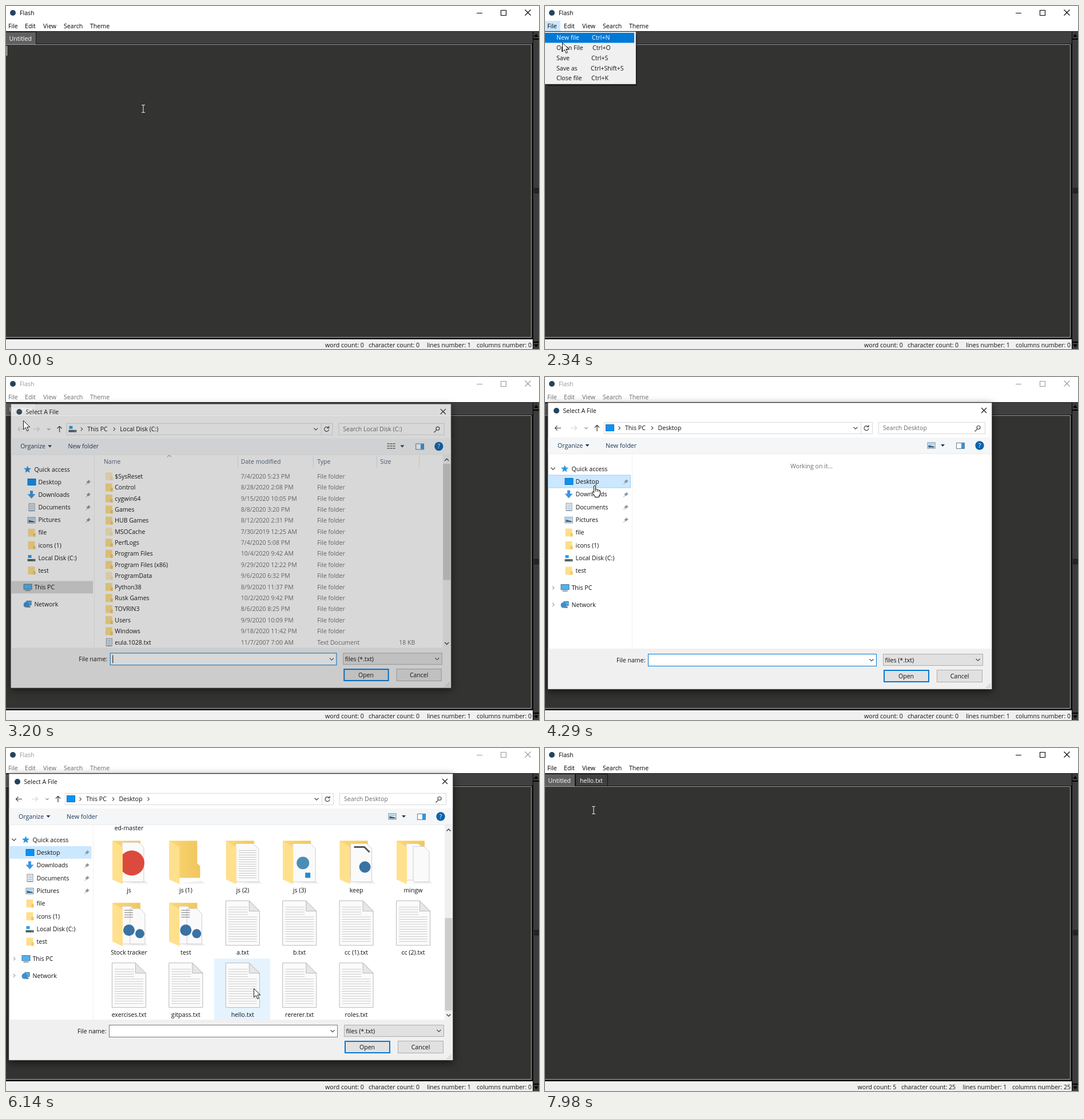
These frames come from a looping animation (932x601 px, 8 s). An HTML page:

```html
<!DOCTYPE html>
<html lang="en">
<head>
<meta charset="utf-8">
<title>Text editor</title>
<style>
html, body { margin: 0; width: 100%; height: 100%; overflow: hidden; background: #333332; }
svg { display: block; }
text { font: 10.6px "Open Sans", "Noto Sans", sans-serif; white-space: pre; }
</style>
</head>
<body>
<svg id="stage" width="932" height="601" viewBox="0 0 932 601"></svg>
<script>
const LOOP = 8000;
const stage = document.getElementById('stage');

// Markup helpers
const text = (x, y, s, fill = '#111', extra = '') =>
  `<text x="${x}" y="${y + 3.8}" fill="${fill}" ${extra}>${s}</text>`;
const rect = (x, y, w, h, fill, extra = '') =>
  `<rect x="${x}" y="${y}" width="${w}" height="${h}" fill="${fill}" ${extra}/>`;
const box = (x, y, w, h, fill, line, id = '') =>
  rect(x + .5, y + .5, w - 1, h - 1, fill, `stroke="${line}" ${id && `id="${id}"`}`);
const line = (d, color, w = 1, extra = '') =>
  `<path d="${d}" fill="none" stroke="${color}" stroke-width="${w}" ${extra}/>`;
const shape = (d, fill, extra = '') => `<path d="${d}" fill="${fill}" ${extra}/>`;
const dot = (x, y, r, fill) => `<circle cx="${x}" cy="${y}" r="${r}" fill="${fill}"/>`;
const group = (id, body, extra = '') => `<g id="${id}" ${extra}>${body}</g>`;
const down = (x, y, c = '#444', r = 3.5) => line(`M${x - r} ${y - r / 2}l${r} ${r}l${r} ${-r}`, c, 1.1);
const right = (x, y, c = '#555') => line(`M${x - 1.5} ${y - 3}l3 3l-3 3`, c, 1.1);
const caretDown = (x, y, c) => shape(`M${x - 3.5} ${y - 2}h7l-3.5 4z`, c);
const feather = (x, y) => dot(x, y, 5, '#24435c');

// Small icons, centred on x, y
const miniFolder = (x, y, o = 1) =>
  `<g opacity="${o}">${rect(x - 6, y - 7, 12, 14, '#ffdf8a')}${rect(x + 3, y + 1, 4, 6, '#f3c85c')}</g>`;
const miniDoc = (x, y) => box(x - 5, y - 7, 11, 14, '#fff', '#7a8a96') +
  line(`M${x - 3} ${y - 3.5}h7m-7 3h7m-7 3h7m-7 3h7`, '#6c8fae');
const icons = {
  star: (x, y) => shape(`M${x} ${y - 6.5}l1.8 4.4l4.7 .3l-3.6 3l1.2 4.7l-4.1-2.6l-4.1 2.6l1.2-4.7l-3.6-3l4.7-.3z`, '#2f96e0'),
  desk: (x, y) => box(x - 7, y - 6, 15, 12, '#0a93f5', '#0a6cbd'),
  down: (x, y) => shape(`M${x - 2.5} ${y - 7}h5v6h4.5l-7 8l-7-8h4.5z`, '#3b96e3'),
  doc: miniDoc,
  pic: (x, y) => box(x - 7, y - 5, 14, 11, '#f4f8fa', '#75828c') + rect(x - 5, y - 3, 10, 3, '#9fd0f0') +
    shape(`M${x - 5} ${y + 4}v-4l4 1l6 1v2z`, '#2d5a80'),
  folder: miniFolder,
  drive: (x, y) => rect(x - 7, y + 2, 14, 4, '#555c63') + rect(x + 3, y + 3.5, 2, 1, '#5cf07a') +
    rect(x - 6, y - 5, 6, 5, '#20a0ec'),
  pc: (x, y) => box(x - 7, y - 6, 15, 10, '#4fb3f3', '#4d6f8a') + rect(x - 4, y + 5, 9, 1.5, '#6d7e8b'),
  net: (x, y) => box(x - 2, y - 6, 9, 8, '#4fb3f3', '#3d6c92') + dot(x - 2, y + 1, 5, '#3d8fd0') + rect(x, y + 3, 5, 3, '#6d7e8b')
};
const pin = (x, y) => shape(`M${x} ${y - 4}l4 4l-2 .5l-2 2.5l-1.5-1l-3 3l-.5-.5l3-3l-1.5-2l3-1.5z`, '#8b959c');

// Large icons; x is the tile centre, y the middle of its label
const paper = (x, y) => {
  let rows = '';
  for (let i = 0; i < 15; i++) rows += `M${x - 25} ${y - 79.5 + i * 4.3}h${i < 4 ? 34 : 50}`;
  return shape(`M${x - 29.5} ${y - 90.5}h41l18 18v60h-59z`, '#fbfbfb', 'stroke="#b9b9b9"') +
    line(rows, '#c9c9c9') + shape(`M${x + 11.5} ${y - 90.5}v18h18z`, '#e6e6e6', 'stroke="#b9b9b9"');
};
const sheet = (x, y, w, h) => shape(`M${x} ${y}h${w - 9}l9 9v${h - 9}h${-w}z`, '#fafafa', 'stroke="#cfcfcf"');
const lines = (x, y, w, n, c) => {
  let d = '';
  for (let i = 0; i < n; i++) d += `M${x} ${y + i * 4}h${w}`;
  return line(d, c);
};
const fills = {
  disc: (x, y) => sheet(x - 12, y - 84, 38, 69) + dot(x + 5, y - 48, 22, '#dc4a3d'),
  text: (x, y) => sheet(x - 12, y - 82, 40, 67) + lines(x - 7, y - 70, 31, 13, '#c6c6c6'),
  code: (x, y) => sheet(x - 12, y - 82, 40, 67) + dot(x + 6, y - 48, 11, '#4b8db5') + rect(x + 10, y - 31, 9, 9, '#2489ca'),
  snake: (x, y) => sheet(x - 10, y - 82, 37, 67) + line(`M${x - 4} ${y - 76}h18l9 9`, '#555', 3) +
    dot(x + 15, y - 41, 10, '#3972a3'),
  pages: (x, y) => sheet(x - 12, y - 82, 30, 64) + sheet(x, y - 77, 28, 62),
  snakes: (x, y) => sheet(x - 12, y - 81, 24, 66) + sheet(x + 2, y - 77, 26, 62) +
    lines(x - 8, y - 74, 15, 4, '#777') + dot(x, y - 39, 10, '#3972a3') + dot(x + 19, y - 33, 8, '#3972a3')
};
const folder = (x, y, kind) => {
  const back = shape(`M${x - 29} ${y - 87}h49v40l5 4v21h-54z`, 'url(#fold)');
  const flap = shape(`M${x - 29} ${y - 87}l18 11v65l-18-8z`, '#ffe08d');
  return shape(`M${x - 10} ${y - 12}l38-5l6 5z`, '#eee') + back + (kind ? fills[kind](x, y) : '') + flap;
};
const tileX = c => 215 + c * 99.4;
const tile = (c, y, name, icon) => icon + text(tileX(c), y, name, '#111', 'text-anchor="middle"');

// Editor window
const menus = [[4, 'File'], [33, 'Edit'], [65, 'View'], [101, 'Search'], [147, 'Theme']];
const editor = rect(0, 0, 932, 45, '#fff') + feather(12, 12) +
  rect(0, 26, 27, 18, '#cce8ff', 'id="menuHot"') +
  group('title', text(24, 12, 'Flash', 'currentColor')) +
  group('menuBar', menus.map(m => text(m[0], 35, m[1], 'currentColor')).join('')) +
  group('winBtns', line('M823 12.5h10M865.5 7.5h9v9h-9zM907.5 6.5l10 10m0-10l-10 10', 'currentColor', 1.1)) +
  rect(0, 44, 932, 1, '#222') + rect(0, 45, 921, 22, '#404040') + rect(0, 66, 921, 2, '#111') +
  rect(0, 68, 921, 514, '#333332') + line('M0 67.5H918.5V580.5H0', '#a0a0a0') +
  rect(0, 582, 921, 2, '#0c0c0c') + rect(919, 67, 2, 517, '#1b1b1b') +
  rect(0, 46, 52, 21, '#606060') + line('M0 45.5H52.5V67', '#161616') + text(5.5, 57, 'Untitled', '#fff') +
  group('newTab', rect(54, 46, 55, 20, '#404040') + line('M53.5 67V45.5H109.5V67', '#111') + text(61, 57, 'hello.txt', '#fff')) +
  rect(0, 584, 921, 17, '#f0f0f0') + group('status', [0, 1, 2, 3].map(() => text(0, 594, '')).join('')) +
  rect(921, 45, 11, 556, '#3c3c3c') + rect(921, 45, 1, 556, '#000') +
  rect(922, 57, 10, 2, '#000') + rect(922, 588, 10, 2, '#000') +
  shape('M923 54h8l-4-5zM923 593h8l-4 5z', '#000') +
  line('M923 319.5h9m-9 2h9m-9 2h9m-9 2h9m-9 2h9', '#0a0a0a') +
  rect(1, 70, 1, 17, '#fff', 'id="caret"');

// File menu
const fileItems = [['New file', 82, 'Ctrl+N'], ['Open File', 83, 'Ctrl+O'], ['Save', 81, 'Ctrl+S'],
  ['Save as', 80, 'Ctrl+Shift+S'], ['Close file', 81, 'Ctrl+K']];
const itemY = i => 55.5 + i * 17.75;
const menuRow = (m, i) => group('item' + i, text(20, itemY(i), m[0], 'currentColor') + text(m[1], itemY(i), m[2], 'currentColor'));
const fileMenu = group('fileMenu', rect(3, 49, 158, 91, '#000', 'opacity=".35"') + box(-1, 45, 160, 92, '#f0f0f0', '#cfcfcf') +
  rect(0, 47, 156, 17.5, '#0078d7', 'id="itemHot"') + fileItems.map(menuRow).join('')) +
  group('itemFade', rect(0, 64.5, 156, 17.5, '#0078d7') + text(20, 73, 'Open File', '#fff') + text(83, 73, 'Ctrl+O', '#fff'));

// Dialog
const nav = [['star', 'Quick access'], ['desk', 'Desktop'], ['down', 'Downloads'], ['doc', 'Documents'], ['pic', 'Pictures'],
  ['folder', 'file'], ['folder', 'icons (1)'], ['drive', 'Local Disk (C:)'], ['folder', 'test'], ['pc', 'This PC'], ['net', 'Network']];
const navY = i => 160.7 + i * 22.35 + (i > 8 ? 7.3 * (i - 8) : 0);
const navRow = ([icon, name], i) => {
  const dx = i === 0 || i > 8 ? 0 : 7;
  return icons[icon](34.5 + dx, navY(i)) + text(46.5 + dx, navY(i), name) + (i > 0 && i < 5 ? pin(142, navY(i)) : '');
};

const drive = ['$SysReset|7/4/2020 5:23 PM', 'Control|8/28/2020 2:08 PM', 'cygwin64|9/15/2020 10:05 PM', 'Games|8/8/2020 3:20 PM',
  'HUB Games|8/12/2020 2:31 PM', 'MSOCache|7/30/2019 12:25 AM', 'PerfLogs|7/4/2020 5:08 PM', 'Program Files|10/4/2020 9:42 AM',
  'Program Files (x86)|9/29/2020 12:22 PM', 'ProgramData|9/6/2020 6:32 PM', 'Python38|8/9/2020 11:37 PM',
  'Rusk Games|10/2/2020 9:42 PM', 'TOVRIN3|8/6/2020 8:25 PM', 'Users|9/9/2020 10:09 PM', 'Windows|9/18/2020 11:42 PM',
  'eula.1028.txt|11/7/2007 7:00 AM'];
const driveRow = (entry, i) => {
  const [name, date] = entry.split('|'), y = 173 + i * 19.55, isText = i === 15;
  const hidden = [0, 5, 9].includes(i);
  return (isText ? miniDoc(178, y) : miniFolder(178, y, hidden ? .5 : 1)) + text(188.5, y, name) +
    text(411, y, date, '#6d6d6d') + text(545.5, y, isText ? 'Text Document' : 'File folder', '#6d6d6d') +
    (isText ? text(718, y, '18 KB', '#6d6d6d', 'text-anchor="end"') : '');
};
const driveView = group('driveView',
  [[169, 'Name'], [411, 'Date modified'], [545.5, 'Type'], [656.5, 'Size']].map(h => text(h[0], 146.5, h[1], '#4c607a')).join('') +
  line('M405.5 136v23m133-23v23m112-23v23m75-23v23', '#e3e3e3') + line('M281 139l3.5-3.5l3.5 3.5', '#777') +
  drive.map(driveRow).join(''));

const early = ['app', 'backup', 'cpp', 'css', 'data', 'demo', 'docs', 'drafts', 'editor', 'forms', 'html', 'images',
  'text-', 'ide', 'java', 'jobs', 'joke', 'jquery'];
const folders = [['js', 'disc'], ['js (1)', ''], ['js (2)', 'text'], ['js (3)', 'code'], ['keep', 'snake'], ['mingw', 'pages'],
  ['Stock tracker', 'snakes'], ['test', 'snakes']];
const files = ['a.txt', 'b.txt', 'cc (1).txt', 'cc (2).txt', 'exercises.txt', 'gitpass.txt', 'hello.txt', 'rererer.txt', 'roles.txt'];
const place = (i, name, make) => {
  const c = i % 6, y = 249.5 + 108.8 * Math.floor(i / 6);
  return tile(c, y, name, make(tileX(c), y));
};
const deskView = group('deskView', group('scroll',
  rect(0, 0, 98, 108, '#e5f3ff', 'id="tileHot"') +
  early.map((n, i) => {
    const c = i % 6, y = -80 + 103 * Math.floor(i / 6);
    return tile(c, y, n, folder(tileX(c), y, i % 3 ? 'text' : ''));
  }).join('') + text(tileX(0), 140.5, 'ed-master', '#111', 'text-anchor="middle"') +
  folders.map((f, i) => place(i, f[0], (x, y) => folder(x, y, f[1]))).join('') +
  files.map((f, i) => place(i + 8, f, paper)).join('')), 'clip-path="url(#view)"');

const dialog = group('dialog',
  rect(5, 45, 776.5, 502, '#fff', 'stroke="#555" stroke-width=".8" style="filter:drop-shadow(0 4px 7px rgba(0,0,0,.6))"') +
  feather(20, 59) + text(31.5, 59, 'Select A File') + line('M763 54l9 9m0-9l-9 9', '#111', 1.1) +
  line('M28 89.5H17.5m4-4l-4 4l4 4', '#444', 1.2, 'id="back"') + line('M45 89.5h10.5m-4-4l4 4l-4 4', '#d4d4d4', 1.2) +
  down(72, 89.5, '#888', 2.5) + line('M91 95V84.5m-4 4l4-4l4 4', '#444', 1.3) +
  box(103, 79, 470, 21, '#fff', '#d9d9d9') + line('M552.5 80v19', '#d9d9d9') + down(543, 89.5) +
  line('M565 87a4 4 0 1 0 1 3M566 84v3.5h-3.5', '#444', 1.2) +
  right(130, 89.5) + text(140, 89.5, 'This PC') + right(187.5, 89.5) +
  group('atDrive', icons.drive(114, 89) + text(197.5, 89.5, 'Local Disk (C:)')) +
  group('atDesk', icons.desk(113, 89) + text(197.5, 89.5, 'Desktop')) + group('crumb', right(249, 89.5)) +
  box(583, 79, 187, 21, '#fff', '#d9d9d9') + text(591, 89.5, '', '#6d6d6d', 'id="search"') +
  line('M755.5 91.5l-4 4M761 88.5a3 3 0 1 1-6 0a3 3 0 1 1 6 0', '#444', 1.2) +
  rect(5.5, 106, 775.5, 28, '#f5f6f7') + rect(5.5, 134, 775.5, 1, '#ebebeb') +
  text(22, 120, 'Organize', '#1e395b') + caretDown(74, 120, '#1e395b') + text(106, 120, 'New folder', '#1e395b') +
  group('listIcon', line('M669 115.5h4m1 0h4m1 0h4m-14 4h4m1 0h4m1 0h4m-14 4h4m1 0h4m1 0h4', '#666', 1.5)) +
  group('picIcon', icons.pic(675.5, 119.5)) + caretDown(695.5, 120, '#1e395b') +
  box(719, 115, 15, 11, '#fff', '#5f7d95') + rect(728, 116, 5, 9, '#2f96e0') +
  dot(760, 120, 7.7, '#0a63b0') + text(760, 120, '?', '#fff', 'text-anchor="middle" font-weight="bold"') +
  rect(152, 135, 1, 341, '#f0f0f0') +
  rect(5.5, 358, 144.5, 22, '#d9d9d9', 'id="pcRow"') +
  rect(5.5, 172, 144, 22, '#cce8ff', 'id="deskRow"') + rect(5.5, 0, 144, 22, '#e5f3ff', 'id="navHot"') +
  group('chevrons', down(14, 160.5, '#333', 3.7) + right(14.5, navY(9), '#999') + right(14.5, navY(10), '#999')) +
  nav.map(navRow).join('') + driveView + deskView + group('working', text(429, 156.5, 'Working on it...', '#6d6d6d')) +
  group('bar', rect(767, 135, 14, 341, '#f0f0f0') + rect(767.5, 151, 13, 205, '#cdcdcd', 'id="thumb"') +
    line('M770.5 145.5l3.5-3.5l3.5 3.5m-7 21', 'none') + line('M770.5 145.5l3.5-3.5l3.5 3.5M770.5 466.5l3.5 3.5l3.5-3.5', '#444', 1.5)) +
  rect(5.5, 476, 775.5, 70.5, '#f0f0f0') + text(175.5, 496, 'File name:', '#111', 'text-anchor="end"') +
  box(180, 485, 400, 22, '#fff', '#0078d7', 'nameBox') + down(571, 496) +
  group('fileName', rect(183, 488, 42, 15, '#0078d7', 'id="nameSel"') + text(183.5, 496, 'hello.txt', 'currentColor')) +
  rect(184.5, 489, 1, 14, '#000', 'id="nameCaret"') +
  box(591, 485, 175, 21, '#e1e1e1', '#adadad') + text(594.5, 496, 'files (*.txt)') + down(757, 495.5) +
  rect(593, 514, 78, 20, '#e1e1e1', 'id="openBtn" stroke="#0078d7" stroke-width="2"') +
  text(631.5, 524, 'Open', '#111', 'text-anchor="middle"') +
  box(685, 513, 80, 22, '#e1e1e1', '#adadad') + text(725, 524, 'Cancel', '#111', 'text-anchor="middle"') +
  [[0, 0], [-3, 0], [-6, 0], [0, -3], [-3, -3], [0, -6]].map(p => rect(777 + p[0], 543 + p[1], 1.6, 1.6, '#b5b5b5')).join(''));

const pointer = group('pointer',
  group('arrow', shape('M.5 .5v15.5l3.7-3.4l2.6 6l2.5-1l-2.6-5.9h5z', '#fff', 'stroke="#000" stroke-width=".9"')) +
  group('hand', shape('M-1.5 1q1.5-2 3 0v6q2-1 3 .6q2-.6 2.7 1q2.3-.5 2.5 1.5v4.4l-2 3.5v2.5h-7.5v-2l-4.7-5.5q-.8-2 1.2-2l1.8 1.7z', '#fff', 'stroke="#000"') +
    line('M1.5 7v4m3-3.4v3.4m2.7-2.4v3', '#000', .8)) +
  group('beam', line('M-3 -6.5h2.3l.7 .7l.7-.7h2.3M0 -6v12M-3 6.5h2.3l.7-.7l.7 .7h2.3', '#e4e4e4', 1.1)));

stage.innerHTML = `<defs><linearGradient id="fold"><stop offset="0" stop-color="#fbd775"/><stop offset="1" stop-color="#f0c55c"/></linearGradient>
  <clipPath id="view"><rect x="153" y="135" width="614" height="341"/></clipPath></defs>` + editor + fileMenu + dialog + pointer;

const el = {};
stage.querySelectorAll('[id]').forEach(n => el[n.id] = n);
const show = (id, on) => el[id].style.display = on ? '' : 'none';
const set = (id, name, v) => el[id].setAttribute(name, v);
const clamp = v => Math.max(0, Math.min(1, v));
const span = (t, a, b) => clamp((t - a) / (b - a));
const ease = p => p * p * (3 - 2 * p);

// Pointer stops: time, x, y
const stops = [[0, 240, 180], [290, 240, 180], [820, 14, 31], [2090, 14, 31], [2340, 30, 64], [2500, 30, 76], [3280, 30, 76],
  [3480, 48, 132], [4240, 87, 190], [4400, 87, 190], [4860, 703, 260], [5400, 703, 260], [6140, 433, 421], [6200, 412, 427],
  [6320, 401, 424], [6500, 401, 424], [7080, 636, 522], [7390, 636, 522], [7970, 85, 109], [LOOP, 85, 109]];
function pointerAt(t) {
  const i = stops.findIndex(s => s[0] > t);
  const [a, b] = [stops[i - 1], stops[i]], p = ease(span(t, a[0], b[0]));
  return [a[1] + (b[1] - a[1]) * p, a[2] + (b[2] - a[2]) * p];
}

function setStatus(loaded) {
  const xs = loaded ? [546.5, 623, 730.5, 817] : [558, 634, 736, 823];
  const counts = loaded ? [5, 25, 1, 25] : [0, 0, 1, 0];
  ['word count', 'character count', 'lines number', 'columns number'].forEach((name, i) => {
    const n = el.status.children[i];
    n.setAttribute('x', xs[i]);
    n.textContent = `${name}: ${counts[i]}`;
  });
}

function draw(t) {
  const [x, y] = pointerAt(t);
  const away = t >= 3100 && t < 7250;
  for (const id of ['title', 'winBtns']) el[id].style.color = away ? '#999' : '#000';
  el.menuBar.style.color = away ? '#6d6d6d' : '#000';
  show('caret', t < 3100 ? (t + 410) % 900 >= 300 : t >= 7260 && (t - 7260) % 900 < 600);

  const menuOpen = t >= 1680 && t < 2660;
  show('menuHot', menuOpen || (t < 2660 && x < 27 && y < 44));
  set('menuHot', 'fill', menuOpen ? '#cce8ff' : '#e5f3ff');
  show('fileMenu', menuOpen);
  set('fileMenu', 'opacity', span(t, 1660, 1880));
  const item = y < 46 ? -1 : y < 65 ? 0 : 1;
  show('itemHot', item >= 0);
  set('itemHot', 'y', 47 + 17.75 * item);
  fileItems.forEach((m, i) => el['item' + i].style.color = i === item ? '#fff' : '#111');
  show('itemFade', t >= 2660 && t < 2960);
  set('itemFade', 'opacity', 1 - span(t, 2660, 2960));

  const loaded = t >= 7480;
  show('newTab', loaded);
  setStatus(loaded);

  // Dialog fades and grows in, then shrinks out
  const opening = span(t, 3120, 3220), closing = span(t, 7210, 7340);
  const scale = 1 - .045 * (1 - opening) - .048 * closing;
  show('dialog', opening > 0 && closing < 1);
  set('dialog', 'opacity', opening * (1 - closing));
  set('dialog', 'transform', `translate(393 296) scale(${scale}) translate(-393 -296)`);

  const onDesk = t >= 4290, ready = t >= 4370, picked = t >= 6470, confirmed = t >= 7130;
  for (const id of ['atDrive', 'listIcon', 'pcRow', 'driveView']) show(id, !onDesk);
  for (const id of ['atDesk', 'picIcon', 'deskRow']) show(id, onDesk);
  show('crumb', ready);
  show('working', onDesk && !ready);
  show('bar', !onDesk || ready);
  show('deskView', ready);
  set('back', 'stroke', onDesk ? '#444' : '#d4d4d4');
  el.search.textContent = onDesk ? 'Search Desktop' : 'Search Local Disk (C:)';
  const overNav = t >= 3400 && t < 4700 && x < 150 && y > 150;
  const row = Math.floor((y - 149.5) / 22.35);
  show('navHot', overNav && !onDesk);
  set('navHot', 'y', 149.5 + 22.35 * row);
  set('deskRow', 'stroke', overNav ? '#99d1ff' : 'none');
  set('deskRow', 'fill', confirmed ? '#d9d9d9' : '#cce8ff');
  set('chevrons', 'opacity', span(t, 3400, 3600) * (1 - span(t, 7260, 7300)));

  const rolled = ease(span(t, 4450, 4800));
  set('scroll', 'transform', `translate(0 ${307 * (1 - rolled)})`);
  set('thumb', 'y', onDesk ? 151 + 147 * rolled : 151);
  set('thumb', 'height', onDesk ? 162 : 205);

  const col = picked ? 2 : Math.floor((x - 166) / 99.4), line = picked || y >= 369 ? 1 : 0;
  show('tileHot', picked || (t > 5400 && col < 5));
  set('tileHot', 'x', 165 + 99.4 * col);
  set('tileHot', 'y', 260 + 108.8 * line);
  set('tileHot', 'fill', confirmed ? '#d9d9d9' : picked ? '#cce8ff' : '#e5f3ff');

  set('nameBox', 'stroke', !ready || confirmed ? '#0078d7' : '#7a7a7a');
  show('nameCaret', !onDesk && Math.floor((t - 3120) / 530) % 2 === 0);
  show('fileName', picked);
  show('nameSel', confirmed);
  el.fileName.style.color = confirmed ? '#fff' : '#111';
  set('openBtn', 'fill', t > 6900 && x > 592 && y > 512 ? '#e5f1fb' : '#e1e1e1');

  const hand = overNav && y > 172;
  const beam = y > 68 && (t < 1600 || t >= 7390);
  show('hand', hand);
  show('beam', beam);
  show('arrow', !hand && !beam);
  set('pointer', 'transform', `translate(${Math.round(x)} ${Math.round(y)})`);
}

const start = performance.now();
function tick(now) {
  draw(Math.max(0, now - start) % LOOP);
  requestAnimationFrame(tick);
}
draw(0);
requestAnimationFrame(tick);
</script>
</body>
</html>
```
